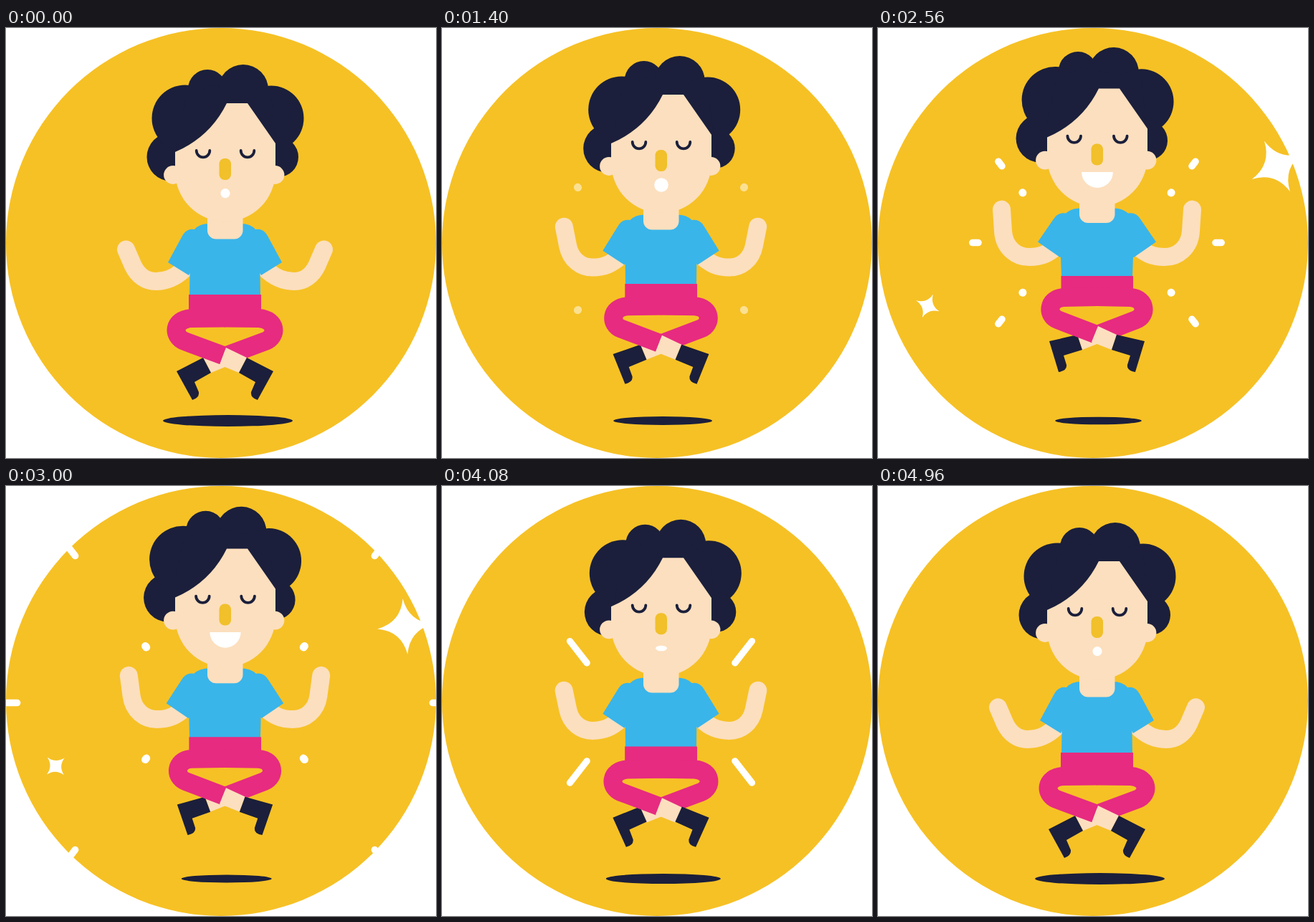
Animation, 600 px wide and 600 px high, one loop 5 s. Source, as an HTML page:

```html
<!DOCTYPE html>
<html lang="en">
<head>
<meta charset="utf-8">
<title>Meditation</title>
<style>
html, body { margin: 0; width: 100%; height: 100%; overflow: hidden; background: #fff; }
svg { display: block; width: 100vw; height: 100vh; }
.skin { fill: #fcdfbe; }
.navy { fill: #1b1f3b; }
.blue { fill: #39b5ea; }
.pink { fill: #e72b80; }
.white { fill: #fff; }
.arm { fill: none; stroke: #fcdfbe; stroke-width: 25; stroke-linecap: round; }
.leg { fill: none; stroke: #e72b80; stroke-width: 26; }
.eye { fill: none; stroke: #1b1f3b; stroke-width: 3.8; stroke-linecap: round; }
.ray { fill: none; stroke: #fff; stroke-linecap: round; }
</style>
</head>
<body>
<svg viewBox="0 0 600 600">
  <circle cx="300" cy="300" r="300" fill="#f6c125"/>
  <g id="fx"></g>
  <ellipse id="shadow" class="navy" cy="548"/>

  <g id="arms">
    <path class="arm"/>
    <path class="arm" transform="translate(611 0) scale(-1 1)"/>
  </g>

  <g id="torso">
    <path class="blue"/>
    <path class="blue" transform="translate(611 0) scale(-1 1)"/>
  </g>

  <path id="hips" class="pink"/>
  <g id="backLeg">
    <path class="leg" transform="translate(611 0) scale(-1 1)"/>
    <path class="skin"/>
    <path class="navy"/>
  </g>
  <g id="frontLeg">
    <path class="leg"/>
    <path class="skin" transform="translate(611 0) scale(-1 1)"/>
    <path class="navy" transform="translate(611 0) scale(-1 1)"/>
  </g>

  <rect id="neck" class="skin" x="281" y="245" width="49.5" height="49.5" rx="12"/>

  <g id="head">
    <g id="hair" class="navy">
      <circle cx="230" cy="180" r="33.5"/>
      <circle cx="250" cy="126" r="46.5"/>
      <circle cx="281" cy="85" r="27"/>
      <circle cx="331" cy="86" r="35"/>
      <circle cx="370" cy="126" r="45.5"/>
      <circle cx="380" cy="180" r="28"/>
      <path d="M235 180L250 100L285 80L370 95L380 175Z"/>
    </g>
    <g class="skin">
      <circle cx="233" cy="205" r="12.9"/>
      <circle cx="375.5" cy="205" r="12.9"/>
      <path d="M308 105H337L376 161V200A70 70 0 0 1 236 200V173Q285 152 308 105Z"/>
    </g>
    <path id="eyeL" class="eye" d="M265.7 171a9.3 9.3 0 0 0 18.6 0"/>
    <path id="eyeR" class="eye" d="M327.7 171a9.3 9.3 0 0 0 18.6 0"/>
    <rect x="297.5" y="182" width="16.5" height="30" rx="7.5" fill="#f1c02a"/>
    <path id="mouth" class="white"/>
  </g>
</svg>
<script>
const LOOP = 5000;
const BEATS = [0, 640, 1400, 2520, 3440, 4080, LOOP];
const $ = id => document.getElementById(id);
const set = (el, attrs) => { for (const k in attrs) el.setAttribute(k, attrs[k]); };
const move = (x, y) => `translate(${x.toFixed(2)} ${y.toFixed(2)})`;

// Smooth monotone curve through (time, value) pairs, flat at both ends.
function curve(times, vals) {
  const n = times.length;
  const slope = i => (vals[i + 1] - vals[i]) / (times[i + 1] - times[i]);
  const tan = vals.map((_, i) => {
    if (i === 0 || i === n - 1) return 0;
    const a = slope(i - 1), b = slope(i);
    return a * b <= 0 ? 0 : 2 * a * b / (a + b);
  });
  return t => {
    if (t <= times[0]) return vals[0];
    if (t >= times[n - 1]) return vals[n - 1];
    let i = 0;
    while (t >= times[i + 1]) i++;
    const h = times[i + 1] - times[i], u = (t - times[i]) / h, v = 1 - u;
    return v * v * (1 + 2 * u) * vals[i] + u * u * (3 - 2 * u) * vals[i + 1]
      + h * u * v * (v * tan[i] - u * tan[i + 1]);
  };
}
const beat = (...vals) => curve(BEATS, vals);

// Blend two paths of equal structure.
function morph(a, b, k) {
  const to = b.match(/-?[\d.]+/g);
  let i = 0;
  return a.replace(/-?[\d.]+/g, x => (+x + (to[i++] - x) * k).toFixed(2));
}

const headY = beat(0, -3.3, -12, -20.5, -12.5, -4.7, 0);
const neckY = beat(0, -4, -13, -22.5, -14, -6, 0);
const armUp = beat(0, .33, .56, 1, .54, .53, 0);
const hipUp = beat(0, .205, .577, 1, .59, .33, 0);
const footUp = beat(0, .25, .57, 1, .58, .39, 0);
const shadowR = beat(90.5, 84, 69, 60.3, 68, 80, 90.5);
const eyeGap = beat(0, 0, 0, 1.3, 0, 0, 0);

const HAIR = [0, 640, 1400, 2240, 2560, 2800, 3440, 4080, LOOP];
const hairX = curve(HAIR, [0, 1.5, .7, -1.8, -3, -3.6, -2.6, 2.3, 0]);
const hairY = curve(HAIR, [0, 0, 0, -2.2, -4, -5.8, -2.5, .5, 0]);
const hairTurn = curve(HAIR, [0, 0, 0, .7, 1.1, 1.2, .4, 0, 0]);

const LIPS = [0, 640, 1400, 1900, 2300, 3440, 4080, 4450, LOOP];
const lipW = curve(LIPS, [6.6, 7.8, 9.8, 11, 22, 21, 8, 6.6, 6.6]);
const lipTop = curve(LIPS, [6.6, 7.8, 9.8, 9, 0, 0, 3.6, 6.6, 6.6]);
const lipLow = curve(LIPS, [6.6, 7.8, 9.8, 11, 22, 21, 4, 6.6, 6.6]);
const lipY = curve(LIPS, [230.6, 230.8, 231, 230, 221.5, 221.5, 231, 230.6, 230.6]);

const ARM = ["M167.5 309L177 331C184 346 196 353.5 209 353.5S235 350 250 335",
             "M172.5 275.5L174.5 306C176 329 193 342 211 342S238 337 252 325"];
const SHIRT = ["M306 273L283 273Q270 273 263 281Q252 279 246 290L226 327L255 345L256.5 342L256 ",
               "M306 274L283 274Q270 274 262 281Q251 279 245 289L223 321L254 342.5L255 342L256 "];
const HIPS = ["M255 372L356 372L356 417L255 417Z", "M255.5 346L356 346L356 388L255.5 388Z"];
const LEG = ["M306 404.5L258 405C233 407 232 430 249 437L303 457",
             "M306 375L258 376C237 378 235 401 251 407L303 427"];
const ANKLE = ["M304 446L275 460L286 481L313 470Z", "M304 416L278 428L285 449L313 438Z"];
const BOOT = ["M275 460L238 479L260 519Q270 516 269 508L263 494L286 481Z",
              "M278 428L239 437L252 480Q264 478 263 470L259 457L285 449Z"];

const svgNode = (tag, cls) => {
  const el = document.createElementNS("http://www.w3.org/2000/svg", tag);
  el.setAttribute("class", cls);
  return $("fx").appendChild(el);
};

// Each burst throws rays outwards; tail and tip are distances from the base.
const dots = start => ({
  x: 103.5, y: 69.5, width: 10.8, from: start, to: start + 890,
  tail: curve([start, start + 800, start + 900], [0, 20, 22]),
  tip: curve([start, start + 60, start + 800, start + 900], [0, 1, 20.6, 22]),
  alpha: curve([start + 500, start + 800, start + 890], [1, .5, 0])
});
const bursts = [
  dots(600),
  dots(2530),
  { x: 135, y: 110, side: 169.5, width: 9.6, from: 2480, to: 3240,
    tail: curve([2480, 2560, 2800, 3000, 3240], [-4, -4, 40, 120, 220]),
    tip: curve([2480, 2560, 2800, 3000, 3240], [-4, 4, 88, 180, 225]),
    alpha: () => 1 },
  { x: 103, y: 68, width: 9.2, from: 3880, to: 4400,
    tail: curve([4060, 4400], [0, 50]),
    tip: curve([3880, 4080, 4400], [0, 39, 51]),
    alpha: curve([4260, 4400], [1, 0]) }
];
bursts.forEach(b => { b.el = svgNode("path", "ray"); set(b.el, { "stroke-width": b.width }); });

const stars = [
  { x: 89, y: 192, turn: t => (t - 600) * .05,
    size: curve([160, 560, 640, 760, 1110], [0, 18.5, 20.2, 21.5, 0]) },
  { x: 69.3, y: 408.3, turn: t => 25 + (t - 2560) * .05,
    size: curve([2080, 2240, 2560, 2760, 3440, 3880], [0, 13, 17.8, 19, 8.8, 0]) },
  { x: 557, y: 213.5, turn: t => -27 + (t - 2560) * .05,
    size: curve([2270, 2560, 2760, 3360, 3440, 3940, 4060], [0, 39.5, 43, 26.5, 24, 11, 0]) }
];
stars.forEach(s => {
  s.el = svgNode("path", "white");
  set(s.el, { d: "M0-1Q.15-.15 1 0Q.15 .15 0 1Q-.15 .15-1 0Q-.15-.15 0-1Z" });
});

function rayPath(b, t) {
  const a = b.tail(t), z = b.tip(t) + .01;
  let d = "";
  for (const sx of [-1, 1]) {
    for (const sy of [-1, 1]) {
      const at = r => `${sx * (b.x + .614 * r)} ${sy * (b.y + .789 * r)}`;
      d += `M${at(a)}L${at(z)}`;
    }
    if (b.side) d += `M${sx * (b.side + a)} 0L${sx * (b.side + z)} 0`;
  }
  return d;
}

function draw(t) {
  const hy = headY(t), ny = neckY(t), arm = armUp(t), hip = hipUp(t), foot = footUp(t);

  for (const b of bursts) {
    const on = t >= b.from && t < b.to;
    set(b.el, { visibility: on ? "visible" : "hidden" });
    if (on) set(b.el, { d: rayPath(b, t), opacity: b.alpha(t), transform: move(305.5, 320 + hy) });
  }
  for (const s of stars) {
    const size = s.size(t);
    set(s.el, {
      visibility: size > .1 ? "visible" : "hidden",
      transform: `${move(s.x, s.y + hy)} rotate(${s.turn(t)}) scale(${size})`
    });
  }

  const r = shadowR(t);
  set($("shadow"), { rx: r, ry: r * .088, cx: 307.5 + (r - 60) / 15 });

  set($("arms"), { transform: move(0, ny) });
  for (const el of $("arms").children) set(el, { d: morph(...ARM, arm) });
  const hem = 373 - 26 * hip - ny;
  set($("torso"), { transform: move(0, ny) });
  for (const el of $("torso").children) set(el, { d: morph(...SHIRT, arm) + hem + "H306Z" });

  set($("hips"), { d: morph(...HIPS, hip) });
  for (const id of ["backLeg", "frontLeg"]) {
    const [leg, ankle, boot] = $(id).children;
    set(leg, { d: morph(...LEG, hip) });
    set(ankle, { d: morph(...ANKLE, (hip + foot) / 2) });
    set(boot, { d: morph(...BOOT, foot) });
  }

  set($("neck"), { transform: move(0, ny) });
  set($("head"), { transform: move(0, hy) });
  set($("hair"), { transform: `${move(hairX(t), hairY(t))} rotate(${hairTurn(t)} 306 130)` });
  set($("eyeL"), { transform: move(-eyeGap(t), 0) });
  set($("eyeR"), { transform: move(eyeGap(t), 0) });

  const w = lipW(t), y = lipY(t);
  set($("mouth"), {
    d: `M${306 - w} ${y}A${w} ${lipTop(t)} 0 0 1 ${306 + w} ${y}A${w} ${lipLow(t)} 0 0 1 ${306 - w} ${y}Z`
  });
}

const start = performance.now();
function tick() {
  draw((performance.now() - start) % LOOP);
  requestAnimationFrame(tick);
}
draw(0);
requestAnimationFrame(tick);
</script>
</body>
</html>
```
